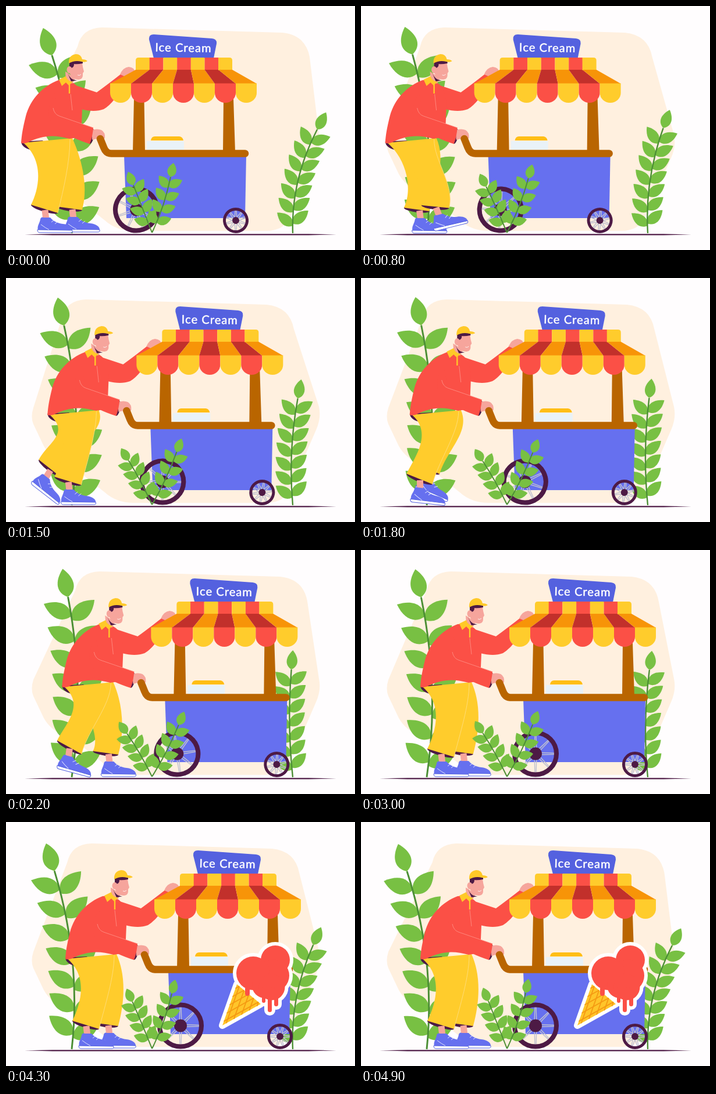
An HTML page that plays this animation: 600 by 421 pixels, repeating every 5 s.

```html
<!DOCTYPE html>
<html lang="en">
<head>
<meta charset="utf-8">
<title>Ice cream cart</title>
<style>
html, body { margin: 0; width: 100%; height: 100%; overflow: hidden; background: #fffdfe; }
svg { display: block; width: 100vw; height: 100vh; }
</style>
</head>
<body>
<svg viewBox="0 0 600 421" xmlns="http://www.w3.org/2000/svg">
  <path id="blob" fill="#fff0df"/>
  <path d="M32 394.3L80 393.2H520L568 394.3L520 395.5H80Z" fill="#4d1a45"/>
  <g id="back"></g>
  <g id="man">
    <path d="M196 137L232 149Q250 136 274 117L286 125Q262 168 244 178Q228 184 205 178Z" fill="#fb5046"/>
    <path d="M272 118Q277 106 287 105Q297 106 298 114L288 125Z" fill="#f6a59c"/>
    <path d="M102 234Q103 244 118 248L140 232Z" fill="#4d1a45"/>
    <g id="legs"></g>
    <path d="M166 128C140 138 118 160 110 190C105 210 103 222 102 236Q104 238 112 236C140 222 160 222 185 229L205 226L207 178C208 160 204 140 192 133Q180 126 166 128Z" fill="#fb5046"/>
    <g id="head">
      <path d="M180 113L181 128L192 134L197 124Z" fill="#f6a59c"/>
      <path d="M184 116Q190 130 202 128L190 130Z" fill="#4d1a45"/>
      <path d="M187 98H209Q210 107 212 113L210 116Q211 127 203 127Q191 127 187 114Z" fill="#f6a59c"/>
      <path d="M187 95H210V99Q200 101 195 100Q195 106 190 107L187 109Z" fill="#4d1a45"/>
      <ellipse cx="187" cy="110" rx="4.500" ry="6" fill="#f6a59c"/>
      <path d="M201 119Q204 121 207 118" fill="none" stroke="#fff" stroke-width=".8"/>
      <path d="M186 99Q185 85 198 83Q207 83 209 92Q215 92 218 95Q214 98 208 96Q196 93 186 99Z" fill="#ffc928"/>
      <path d="M169 127L181 121Q183 129 193 131L186 137L181 132L174 138Z" fill="#ffc928"/>
      <path d="M187 133V151" stroke="#ffc928" stroke-width="2.4"/>
    </g>
    <ellipse cx="223" cy="225" rx="4" ry="13" transform="rotate(12 223 225)" fill="#4d1a45"/>
    <path d="M223 214Q233 211 240 214Q247 218 246 228Q240 232 236 228L224 231Z" fill="#f6a59c"/>
    <path d="M160 150C145 175 145 200 165 212C180 222 200 232 220 238Q225 225 226 210L168 190Z" fill="#fb5046"/>
    <path d="M157 176Q159 187 168 190L226 210M187 152L190 180" fill="none" stroke="#ff958b" stroke-width=".8"/>
  </g>
  <g id="cart">
    <path d="M279 258H489L487 366H283Z" fill="#6670ef"/>
    <path d="M318 233H382V248H318Z" fill="#e9f2f8"/>
    <path d="M325 232Q326 225 332 225H374Q380 226 381 232Z" fill="#ffbe16"/>
    <path d="M296 160H313.500L315 252H294ZM450 160H467L470 252H449Z" fill="#b96500"/>
    <path d="M238 229L244 244Q248 254.500 257 254.500H487" fill="none" stroke="#b96500" stroke-width="12.6" stroke-linecap="round" stroke-linejoin="round"/>
    <path d="M330 49L430 56Q439 57 438 65L433 90H330L322 58Q321 49 330 49Z" fill="#5461df"/>
    <text x="381" y="79" text-anchor="middle" transform="rotate(1 381 73)" font-family="Lato, 'Open Sans', sans-serif" font-size="20" letter-spacing="1.1" fill="#fff" stroke="#fff" stroke-width=".5">Ice Cream</text>
    <g id="awning"></g>
    <g id="wheels"></g>
    <g id="cone"></g>
  </g>
  <g id="front"></g>
</svg>
<script>
const LOOP = 5000, FRAME = 100, TRAVEL = 76;
const RED = '#fb5046', YELLOW = '#ffcc2c', DARK = '#4d1a45', BLUE = '#6670ef', SKIN = '#f6a59c';
const el = id => document.getElementById(id);
const lerp = (a, b, u) => a + (b - a) * u;
const mix = (p, q, u) => p.map((v, i) => lerp(v, q[i], u));
const clamp = u => Math.max(0, Math.min(1, u));
const wave = u => (1 - Math.cos(Math.PI * clamp(u))) / 2;
const count = (n, f) => Array.from({ length: n }, (_, i) => f(i)).join('');
const shift = (x, y = 0) => `translate(${x} ${y})`;

// keys: rows of [time, ...values]
function track(keys, t) {
  const i = keys.findIndex(k => k[0] > t);
  if (i < 0) return keys[keys.length - 1].slice(1);
  const a = keys[i - 1], b = keys[i];
  return mix(a, b, (t - a[0]) / (b[0] - a[0])).slice(1);
}

function leaf([x, y], angle, len, wide) {
  const w = wide * .68;
  return `<path transform="translate(${x} ${y}) rotate(${angle})" fill="#78c043"
    d="M0 0C${len * .2} ${-w} ${len * .6} ${-w} ${len} 0C${len * .6} ${w} ${len * .2} ${w} 0 0Z"/>`;
}

// A quadratic stem with paired leaves and one at the tip
function plant({ base, mid, end, pairs, first, step, gap, len, wide, spread, stem }, s) {
  const c = mix(mid[0], mid[1], s), e = mix(end[0], end[1], s);
  const at = u => mix(mix(base, c, u), mix(c, e, u), u);
  const dir = u => {
    const [dx, dy] = mix([c[0] - base[0], c[1] - base[1]], [e[0] - c[0], e[1] - c[1]], u);
    return Math.atan2(dy, dx) * 180 / Math.PI;
  };
  return count(pairs, i => {
      const u = first + step * i;
      return leaf(at(u), dir(u) - spread, len, wide) + leaf(at(u + gap), dir(u) + spread, len, wide);
    }) + leaf(e, dir(1), len * .95, wide) +
    `<path d="M${base}Q${c} ${e}" fill="none" stroke="#4c8f35" stroke-width="${stem}"/>`;
}

const TALL = { base: [113, 392], mid: [[129, 240], [137, 240]], end: [[79, 85], [107, 81]],
  pairs: 7, first: .085, step: .135, gap: -.02, len: 52, wide: 27, spread: 57, stem: 3 };
const RIGHT = { base: [493, 392], mid: [[490, 300], [483, 300]], end: [[535, 213], [490, 206]],
  pairs: 7, first: .07, step: .13, gap: .02, len: 35, wide: 18, spread: 50, stem: 2.4 };
const SPRIG = { base: [251, 391], pairs: 4, first: .18, step: .215, gap: .02, len: 26, wide: 15, spread: 52, stem: 2 };
const SPRIG_L = { ...SPRIG, mid: [[234, 347], [231, 350]], end: [[219, 309], [208, 317]] };
const SPRIG_R = { ...SPRIG, mid: [[272, 348], [276, 352]], end: [[283, 295], [297, 302]] };

// Feet: time, x, y, tilt, relative to the cart
const NEAR = [[0, 160, 377, 0], [400, 183, 371, 4], [800, 212, 368, -14], [1100, 199, 377, 0], [1500, 155, 377, 0],
  [1900, 127, 375, 8], [2200, 125, 371, 15], [2450, 140, 370, 8], [2700, 155, 377, 0]];
const FAR = [[0, 207, 376, 0], [800, 178, 378, 0], [1150, 140, 375, 12], [1500, 105, 362, 38],
  [1850, 150, 362, 20], [2050, 188, 371, -8], [2200, 199, 377, 0], [2700, 193, 376, 0]];

function leg([x, y, tilt], near) {
  const r = tilt * Math.PI / 180, a = ((near ? 17 : 8) + tilt * .8) * Math.PI / 180, half = near ? 24 : 22;
  const turn = (px, py) => [x + px * Math.cos(r) - py * Math.sin(r), y + px * Math.sin(r) + py * Math.cos(r)];
  const h = turn(near ? -18 : -22, -27), ox = half * Math.cos(a), oy = half * Math.sin(a);
  const L = [h[0] - ox, h[1] - oy], R = [h[0] + ox, h[1] + oy];
  const side = near ? `${R[0] + 10} ${R[1] - 40} 186 268 186 230` : `${R[0] + 11} ${R[1] - 40} 207 266 190 228`;
  return `<ellipse cx="${h[0]}" cy="${h[1]}" rx="${half}" ry="5" transform="rotate(${a * 180 / Math.PI} ${h})" fill="${DARK}"/>
    <path d="M${turn(-17, -25)}L${turn(-15, -8)}" stroke="${SKIN}" stroke-width="11"/>
    <g transform="translate(${x} ${y}) rotate(${tilt})">
      <path d="M-29 10C-31 2 -26 -2 -25 -9Q-24 -14 -19 -12L-8 -12C-4 -7 4 -2 14 -1C24 0 31 5 30 11Z" fill="${BLUE}"/>
      <path d="M-30 9L30 10Q31 14 27 14H-26Q-30 14 -30 9Z" fill="#fff" stroke="#5461df"/>
      <path d="M-6 -4L-1 -8M0 -1L5 -5M-24 0Q-16 6 -10 9" fill="none" stroke="#dfe2ff"/>
    </g>
    <path d="M106 236C142 268 ${L[0] + 14} ${L[1] - 28} ${L}L${R}C${side}Z" fill="${YELLOW}"/>
    <path d="M${R}C${side}" fill="none" stroke="#ffe08a" stroke-width="${near ? .8 : 0}"/>`;
}

function wheel(x, y, r, tyre, hub, spokes, turn) {
  return `<g transform="translate(${x} ${y}) rotate(${turn * 180 / Math.PI})">` +
    count(spokes, i => `<path d="M2 -2L${r - tyre} -1M2 2L${r - tyre} 1" stroke="#bfc0d0" stroke-width="1.5" transform="rotate(${i * 360 / spokes})"/>`) +
    `<circle r="${r - tyre / 2}" fill="none" stroke="${DARK}" stroke-width="${tyre}"/><circle r="${hub}" fill="${DARK}"/></g>`;
}

function awning() {
  const top = 166 / 7, low = 36;
  return count(7, i => {
    const odd = i % 2, a = 299 + i * top, b = 255 + i * low, bright = odd ? RED : YELLOW;
    const cut = i == 0 ? 'M299 111V94Q299 89 304 89H323V111Z' : i == 6 ? 'M441 111V89H460Q465 89 465 94V111Z'
      : `M${a} 111V89H${a + top}V111Z`;
    return `<path d="${cut}" fill="${bright}"/>
      <path d="M${a} 110H${a + top}L${b + low} 134H${b}Z" fill="${odd ? '#c2302b' : '#f79408'}"/>
      <path d="M${b} 133.500H${b + low}V150A18 17 0 0 1 ${b} 150Z" fill="${bright}"/>`;
  });
}

function cone() {
  const A = [397, 280], B = [438, 314], T = [372, 351];
  const tri = `<path d="M${A}L${B}L${T}Z" stroke-linejoin="round"/>`;
  const ball = (x, y, r) => `<circle cx="${x}" cy="${y}" r="${r}"/>`;
  const drip = (x, w, h) => `<rect x="${x}" y="284" width="${w}" height="${h}" rx="${w / 2}"/>`;
  const cream = ball(463, 238, 25) + ball(459, 265, 28) + ball(425, 261, 29) + ball(445, 282, 22) + ball(457, 285, 22.5) +
    drip(411, 8, 16) + drip(440, 6, 28) + drip(450, 7, 44) + drip(461, 7, 34);
  const grid = count(5, i => {
    const u = (i + .5) / 5, p = mix(A, B, u);
    return `<path d="M${p}L${mix(A, T, u)}M${p}L${mix(B, T, 1 - u)}" stroke="#f59a12" stroke-width="1.8"/>`;
  });
  return `<g fill="#fff" stroke="#fff" stroke-width="12">${tri + cream}</g>
    <g fill="#ffc52a">${tri}</g>${grid}<g fill="${RED}">${cream}</g>`;
}

el('awning').innerHTML = awning();
el('cone').innerHTML = cone();

function pop(t) {
  const v = clamp((t - 3050) / 500) - 1;
  return Math.max(0, 1 + 2.7 * v ** 3 + 1.7 * v ** 2);
}

function sway(t) {
  if (t > 2400) return 1 - wave((t - 2400) / 2550);
  const u = t / 2400;
  return .7 * wave(u) + .3 * (1 - (1 - u) ** 2);
}

function draw(t) {
  const dx = TRAVEL * (wave(t / 2670) - 1), s = sway(t), d = 15 * Math.cos(t / 2500 * 2 * Math.PI);
  el('blob').setAttribute('d', `M${150 + d} 37L${460 + d} 46Q${500 + d} 50 ${507 + d} 88L538 222Q542 240 534 260L490 362
    Q478 389 445 388H220Q190 388 170 370L120 330L100 320Q76 310 65 290L47 252Q42 240 47 224L${108 + d} 70Q${115 + d} 38 ${150 + d} 37Z`);
  el('back').innerHTML = plant(TALL, s) + plant(RIGHT, s);
  el('front').innerHTML = plant(SPRIG_L, s) + plant(SPRIG_R, s);
  el('man').setAttribute('transform', shift(dx));
  el('cart').setAttribute('transform', shift(dx));
  const [lean] = track([[0, -2], [800, -1], [1500, -3], [2200, -4], [2700, 0]], t);
  el('head').setAttribute('transform', shift(lean));
  el('legs').innerHTML = leg(track(FAR, t), false) + leg(track(NEAR, t), true);
  el('wheels').innerHTML = wheel(300, 351.500, 40, 8, 11, 8, dx / 40) + wheel(471, 370, 22, 5, 6, 10, dx / 22);
  const k = pop(t);
  el('cone').setAttribute('transform', `translate(430 282) scale(${k}) translate(-430 -282)`);
  el('cone').setAttribute('visibility', k > 0 ? 'visible' : 'hidden');
}

const start = performance.now();
function tick() {
  const t = (performance.now() - start) % LOOP;
  draw(Math.floor(t / FRAME) * FRAME);
  requestAnimationFrame(tick);
}
tick();
</script>
</body>
</html>
```
